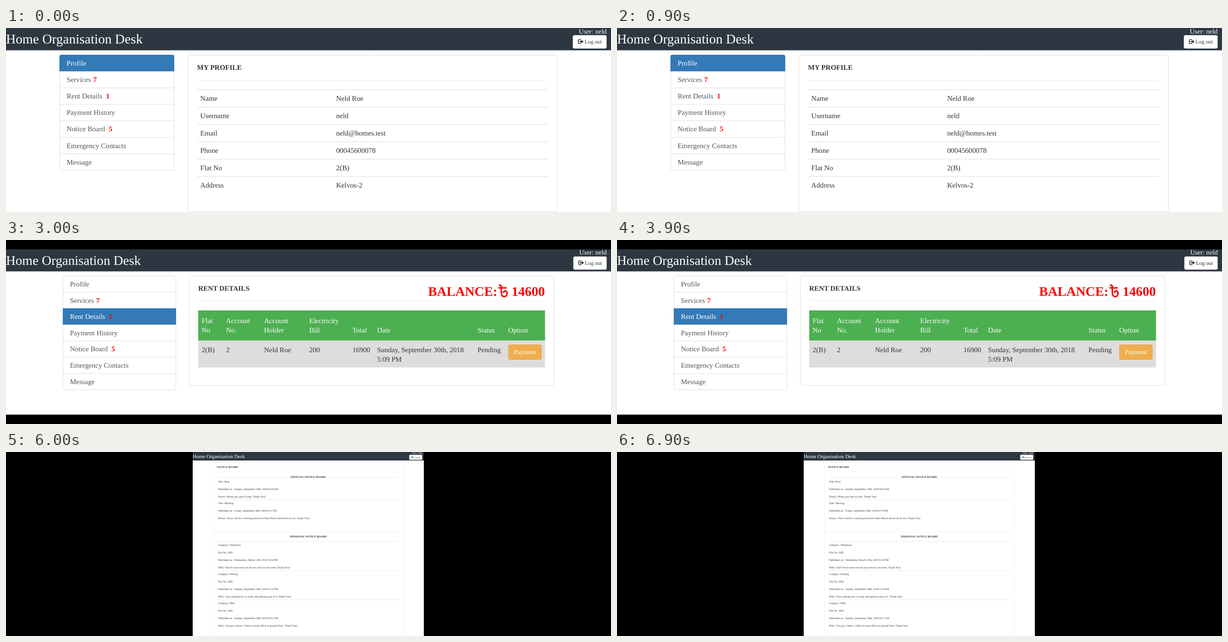
These frames come from a looping animation (1280 px wide and 392 px high, 7500 ms). An HTML page with a canvas:

```html
<!DOCTYPE html>
<html lang="en">
<head>
<meta charset="utf-8">
<title>Resident pages</title>
<style>
  html, body { margin: 0; width: 100%; height: 100%; overflow: hidden; background: #fff; }
  canvas { display: block; }
</style>
</head>
<body>
<canvas id="stage" width="1280" height="392"></canvas>
<script>
const W = 1280, H = 392, HOLD = 1500;
const ctx = document.getElementById('stage').getContext('2d');
const FONT = '"Liberation Serif", "Times New Roman", serif';
const INK = '#333', LINE = '#ddd', FAINT = '#eee';
const BLUE = '#337ab7', GREEN = '#5cb85c', AMBER = '#f0ad4e', RED = '#f00';

const SITE = 'Home Organisation Desk';
const USER = 'neld';
const FULL_NAME = 'Neld Roe';
const MENU = [
  ['Profile'], ['Services', ' 7', 1], ['Rent Details', '  1'], ['Payment History'],
  ['Notice Board', '  5'], ['Emergency Contacts'], ['Message']
];

function text(str, x, y, size, { color = INK, bold = false, align = 'left' } = {}) {
  ctx.font = `${bold ? 'bold ' : ''}${size}px ${FONT}`;
  ctx.textAlign = align;
  ctx.fillStyle = color;
  ctx.fillText(str, x, y);
}

function fill(x1, y1, x2, y2, color) {
  ctx.fillStyle = color;
  ctx.fillRect(x1, y1, x2 - x1, y2 - y1);
}

function box(x1, y1, x2, y2, r, color, border, width = 1) {
  ctx.beginPath();
  ctx.roundRect(x1, y1, x2 - x1, y2 - y1, r);
  if (color) { ctx.fillStyle = color; ctx.fill(); }
  if (border) { ctx.strokeStyle = border; ctx.lineWidth = width; ctx.stroke(); }
}

function rule(x1, x2, y, color = LINE, width = 1) {
  fill(x1, y - width / 2, x2, y + width / 2, color);
}

function polygon(color, ...pts) {
  ctx.fillStyle = color;
  ctx.beginPath();
  pts.forEach(([x, y]) => ctx.lineTo(x, y));
  ctx.fill();
}

function row(cells, xs, y, size, color) {
  cells.forEach((cell, i) => text(cell, xs[i], y, size, { color }));
}

function button(label, x1, y1, x2, y2, size, color, border) {
  box(x1, y1, x2, y2, size / 4, color, border);
  text(label, (x1 + x2) / 2, (y1 + y2) / 2 + size * 0.32, size, { color: '#fff', align: 'center' });
}

function exitIcon(x, y) {
  ctx.strokeStyle = INK;
  ctx.lineWidth = 1.6;
  ctx.beginPath();
  ctx.moveTo(x + 6.6, y + 0.8);
  ctx.lineTo(x + 2.4, y + 0.8);
  ctx.quadraticCurveTo(x + 0.8, y + 0.8, x + 0.8, y + 2.4);
  ctx.lineTo(x + 0.8, y + 7.6);
  ctx.quadraticCurveTo(x + 0.8, y + 9.2, x + 2.4, y + 9.2);
  ctx.lineTo(x + 6.6, y + 9.2);
  ctx.stroke();
  fill(x + 3.6, y + 3.6, x + 8, y + 6.4, INK);
  polygon(INK, [x + 7.4, y + 1.2], [x + 12, y + 5], [x + 7.4, y + 8.8]);
}

function header(w) {
  fill(0, 0, w, 47.5, '#2d3742');
  text(SITE, 0, 33, 28.5, { color: '#fff' });
  text('User: ' + USER, w - 9, 11.6, 14.3, { color: '#fff', align: 'right' });
  box(w - 80.5, 15.5, w - 9.5, 43.5, 3, '#fff', '#ccc');
  exitIcon(w - 70, 24);
  text('Log out', w - 56, 33, 11.6);
}

function menu(x, active) {
  const top = i => 57.5 + 35.1 * i;
  const right = x + 242;
  box(x, top(0), right, top(7), 4, '#fff', LINE);
  MENU.forEach(([label, badge, gap = 0], i) => {
    const on = i === active;
    if (i) rule(x, right, top(i));
    if (on) box(x - 0.5, top(i) - 0.5, right + 0.5, top(i + 1) + 0.5, i ? 0 : [4, 4, 0, 0], BLUE);
    text(label, x + 14.8, top(i) + 22.5, 15.2, { color: on ? '#fff' : '#555' });
    if (!badge) return;
    const end = x + 14.8 + ctx.measureText(label + badge.slice(0, -1)).width;
    text(badge.trim(), end + gap, top(i) + 22.5, 15.2, { color: RED, bold: true });
  });
}

function profile() {
  text('MY PROFILE', 404, 89, 15, { bold: true });
  rule(404, 1147, 111.5, FAINT);
  const rows = [
    ['Name', FULL_NAME], ['Username', USER], ['Email', USER + '@homes.test'],
    ['Phone', '00045600078'], ['Flat No', '2(B)'], ['Address', 'Kelvos-2']
  ];
  rows.forEach((cells, i) => {
    rule(404, 1147, 131.5 + 37 * i);
    row(cells, [411, 698.5], 155 + 37 * i, 15.2);
  });
}

function services() {
  const size = 9.2, cols = [501, 744];
  text('MY SERVICES', 497, 54.3, 9.1, { bold: true });
  rule(497, 948, 67.7, FAINT);
  text('Services By', 496.5, 93.5, size);
  box(655.5, 79.8, 773.3, 101.3, 2.5, '#fff', '#ccc', 0.8);
  text('Select', 663, 93.8, size);
  polygon(INK, [761, 90], [763.5, 87.3], [766, 90]);
  polygon(INK, [761, 91.3], [763.5, 94], [766, 91.3]);
  button('Request', 782, 79.5, 823, 99.3, 8.3, BLUE);
  rule(497, 948, 110.5, LINE, 0.8);
  row(['Problem', 'Status'], cols, 124.8, size);
  rule(497, 948, 133.2, LINE, 1.2);
  const jobs = ['Electrician', 'Internet', 'Houseworker', 'Electrician',
    'Plumber', 'Telephone', 'Telephone', 'Houseworker'];
  jobs.forEach((job, i) => {
    const y = 133.3 + 29.4 * i;
    if (i) rule(497, 948, y, LINE, 0.8);
    text(job, cols[0], y + 14.6, size);
    if (i) button('Solved', 744, y + 4.8, 781.6, y + 24.6, 8.25, GREEN);
    else button('Pending', 744, y + 4.8, 785.5, y + 24.6, 8.25, AMBER);
  });
}

function takaSign(x, y) {
  ctx.strokeStyle = RED;
  ctx.lineWidth = 3.2;
  ctx.beginPath();
  ctx.moveTo(x, y - 17);
  ctx.lineTo(x + 18, y - 17);
  ctx.moveTo(x + 1.5, y - 22);
  ctx.quadraticCurveTo(x + 6.5, y - 25, x + 6.5, y - 17);
  ctx.lineTo(x + 6.5, y - 6);
  ctx.bezierCurveTo(x + 6.5, y + 4, x + 18.5, y + 4, x + 18.5, y - 5);
  ctx.bezierCurveTo(x + 18.5, y - 12, x + 11, y - 12, x + 11, y - 6);
  ctx.stroke();
}

function sectionTitle(label) {
  text(label, 406.7, 108, 14.8, { bold: true });
  rule(406.7, 1140.4, 129.5, FAINT);
}

function tableBands(split, bottom) {
  fill(406.7, 150, 1140.4, split, '#4caf50');
  fill(406.7, split, 1140.4, bottom, LINE);
}

function rent() {
  const cols = [414, 465.5, 546, 641.5, 733, 785, 997.5, 1062.5];
  sectionTitle('RENT DETAILS');
  text('BALANCE:', 893, 119, 28.1, { color: RED, bold: true });
  takaSign(1041.5, 119);
  text('14600', 1140, 119, 28.1, { color: RED, bold: true, align: 'right' });
  tableBands(214, 271.5);
  row(['Flat', 'Account', 'Account', 'Electricity'], cols, 176.7, 15, '#fff');
  row(['No', 'No.', 'Holder', 'Bill', 'Total', 'Date', 'Status', 'Option'], cols, 197.3, 15, '#fff');
  row(['2(B)', '2', FULL_NAME, '200', '16900', 'Sunday, September 30th, 2018', 'Pending'], cols, 238.5, 15);
  text('5:09 PM', cols[5], 259, 15);
  button('Payment', 1063, 223.3, 1132.8, 254.5, 13.4, AMBER, '#eea236');
}

function payments() {
  const cols = [414, 448.5, 585.5, 722.5, 852.5];
  sectionTitle('PAYMENT HISTORY');
  tableBands(193.5, 267.2);
  row(['ID', 'Previous Balance', 'Payment Amount', 'Current Balance', 'Date'], cols, 176.7, 15, '#fff');
  row(['22', '32300', '17700', '14600', 'Sunday, September 30th, 2018 8:21 PM'], cols, 217.7, 15);
  row(['20', '50000', '17700', '32300', 'Sunday, September 30th, 2018 8:22 AM'], cols, 254.5, 15);
}

function notices() {
  const size = 5.78;
  const heading = (label, y) => text(label, 639.5, y, size, { bold: true, align: 'center' });
  const list = (y, step, items) => items.forEach((lines, i) => {
    rule(448, 832, y + step * i - 9.5, LINE, 0.6);
    lines.forEach((line, k) => text(line, 448.5, y + step * i + 16 * k, size));
  });
  const flat = 'Flat No: 2(B)', on = 'Published on - ';

  text('NOTICE BOARD', 446, 34, size, { bold: true });
  rule(446, 833, 42.5, FAINT, 0.7);
  heading('OFFICIAL NOTICE BOARD', 54.8);
  list(65.2, 46.1, [
    ['Title: Rent', on + 'Sunday, September 30th, 2018 8:20 AM',
      'Notice: Please pay rent in time. Thank You!'],
    ['Title: Meeting', on + 'Friday, September 28th, 2018 9:31 PM',
      'Notice: There will be a meeting tomorrow 8am.Please attend all of you. Thank You!']
  ]);
  rule(438.5, 840.5, 170, FAINT, 0.8);
  heading('PERSONAL NOTICE BOARD', 182.2);
  list(200.2, 62.1, [
    ['Category: Telephone', flat, on + 'Wednesday, March 13th, 2019 9:54 PM',
      'MSG: Dial 9 from intercom for any service you need. Thank You!'],
    ['Category: Parking', flat, on + 'Sunday, September 30th, 2018 5:10 PM',
      'MSG: Your parking slot is ready and parking num is 4. Thank You!'],
    ['Category: Mail', flat, on + 'Sunday, September 30th, 2018 8:21 AM',
      'MSG: You got a letter. Collect it from office in ground floor. Thank You!']
  ]);
}

// page: left, top, right, bottom on the stage; panel: its bottom edge in page units
const scenes = [
  { page: [0, 0, W, H], scale: 1, active: 0, panel: 391.5, body: profile },
  { back: '#333', page: [251.5, 0, 1028.5, H], scale: 0.606, active: 1, panel: 645.5, body: services },
  { back: '#000', page: [0, 20, W, 372], scale: 0.9865, active: 2, panel: 293.8, body: rent },
  { back: '#000', page: [0, 20, W, 372], scale: 0.9865, active: 3, panel: 289, body: payments },
  { back: '#000', page: [395, 0, 884, H], scale: 0.3815, active: -1, panel: 1025.5, body: notices }
];

function draw({ back = '#fff', page: [x1, y1, x2, y2], scale, active, panel, body }) {
  const width = (x2 - x1) / scale;
  const left = width / 2 - 526.5;
  const hasMenu = active >= 0;
  fill(0, 0, W, H, back);
  fill(x1, y1, x2, y2, '#fff');
  ctx.save();
  ctx.translate(x1, y1);
  ctx.scale(scale, scale);
  header(width);
  if (hasMenu) menu(left, active);
  box(left + (hasMenu ? 271 : 0), 57.5, left + 1053, panel, 4, '#fff', LINE);
  ctx.restore();
  body();
}

ctx.textRendering = 'geometricPrecision';
const start = performance.now();
let shown = -1;

function tick() {
  const index = Math.floor((performance.now() - start) / HOLD) % scenes.length;
  if (index !== shown) draw(scenes[shown = index]);
  requestAnimationFrame(tick);
}
tick();
</script>
</body>
</html>
```
